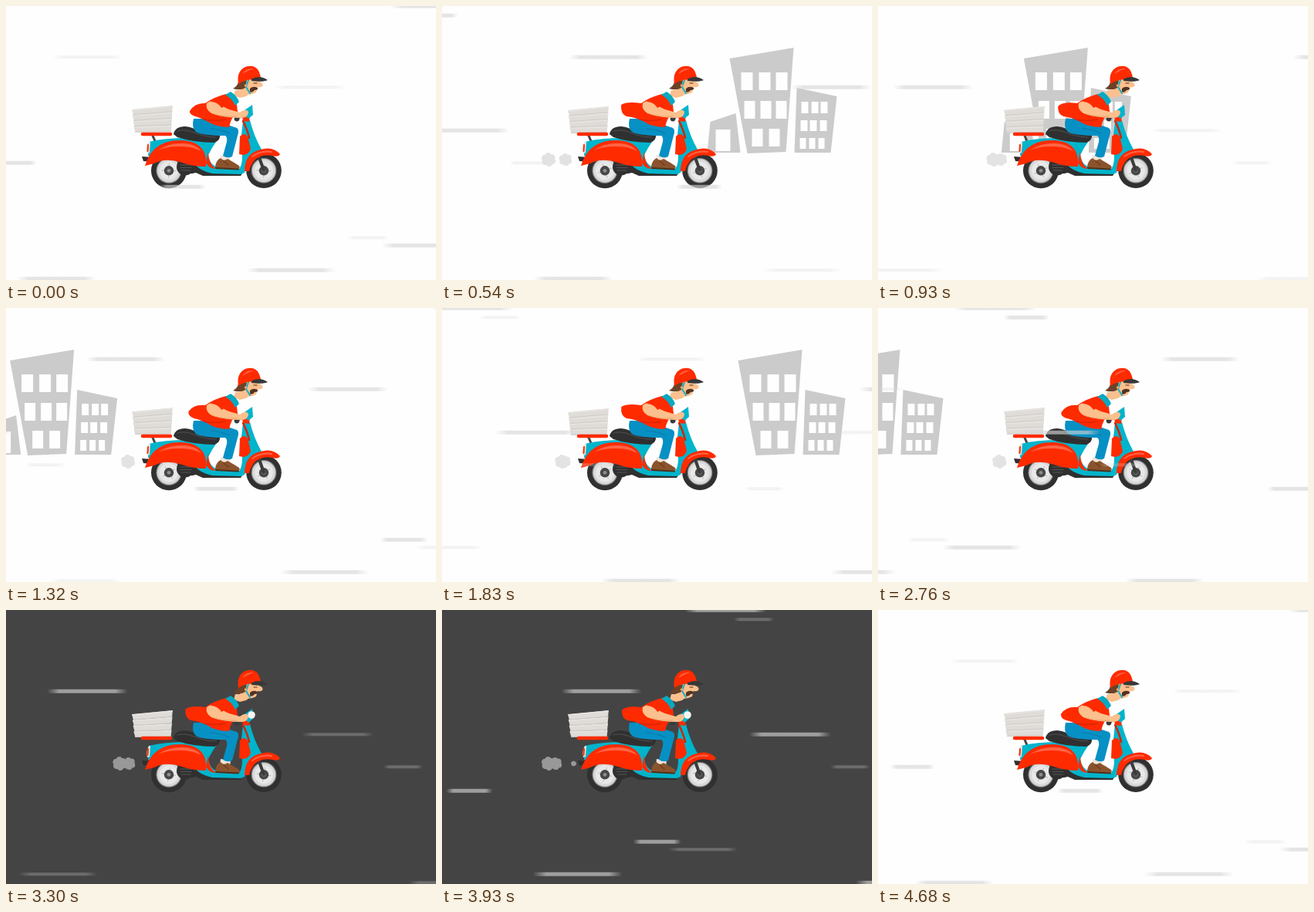
Write an HTML page with a canvas that moves like this. It is 557 px wide and 355 px high and loops after 4710 ms.

```html
<!DOCTYPE html>
<html lang="en">
<head>
<meta charset="utf-8">
<title>Scooter delivery</title>
<style>
html, body { margin: 0; width: 100%; height: 100%; overflow: hidden; background: #fefefe; }
canvas { display: block; }
</style>
</head>
<body>
<canvas id="stage" width="557" height="355"></canvas>
<script>
const ctx = document.getElementById('stage').getContext('2d');
const LOOP = 4710, DUSK = 3000, DAWN = 4480;
const RED = '#ff2b00', CYAN = '#00b4cc', BLACK = '#303030', SKIN = '#fbc08d';
const clamp = v => Math.max(0, Math.min(1, v));
const mix = (a, b, k) => a + (b - a) * clamp(k);

function fill(path, color) {
  ctx.fillStyle = color;
  ctx.fill(new Path2D(path), 'evenodd');
}
function line(path, color, width) {
  ctx.strokeStyle = color;
  ctx.lineWidth = width;
  ctx.lineCap = ctx.lineJoin = 'round';
  ctx.stroke(new Path2D(path));
}
function disc(x, y, r, color) {
  ctx.fillStyle = color;
  ctx.beginPath();
  ctx.arc(x, y, r, 0, Math.PI * 2);
  ctx.fill();
}

// Day and night
const nightAt = t => Math.min(clamp((t - DUSK) / 120), clamp((DAWN - t) / 120));

function drawSky(t) {
  const v = Math.round(mix(254, 68, nightAt(t)));
  ctx.fillStyle = `rgb(${v},${v},${v})`;
  ctx.fillRect(0, 0, 557, 355);
}

// City blocks, relative to the left edge of the tower
const pane = (x, y, w, h) => `M${x} ${y}h${w}v${h}h${-w}z`;
const paneRow = (xs, y, w, h) => xs.map(x => pane(x, y, w, h)).join('');
const TOWER = 'M0 68L83 54L73 189L23 191Z' + paneRow([15, 38, 60], 86, 15, 23) +
  paneRow([19, 40, 60], 123, 14, 23) + paneRow([29, 51], 159, 14, 23);
const BLOCK = 'M87 106L139 117L131 190L84 190Z' + paneRow([93, 106, 118], 124, 9, 15) +
  paneRow([92, 104, 117], 148, 9, 14) + paneRow([91, 103, 115], 171, 8, 14);
const HOUSE = 'M-25 150L8 139L14 190L-29 190Z' + pane(-18, 160, 19, 28);

function drawCity(t) {
  const groups = [[373, 540, TOWER + BLOCK + HOUSE], [384, 1830, TOWER + BLOCK]];
  for (const [x, at, path] of groups) {
    const left = x - (t - at) * 0.471;
    if (left < -145 || left > 600) continue;
    ctx.save();
    ctx.translate(left, 0);
    fill(path, '#cbcbcb');
    ctx.restore();
  }
}

// Speed lines: y, width, delay
const LANES = [
  [0, 106, -240], [12, 60, -183], [66, 103, 0], [105, 104, 259], [161, 106, -165], [203, 58, -70],
  [234, 60, 125], [300, 62, 343], [310, 102, 384], [342, 116, 226], [353, 102, -41]
];
const SINGLE = [0, 12];          // lanes used only by the second kind of wave
const LATE = [300, 310];         // lanes used only by the first kind
const FAINT = [[66, 105, 161, 300], [203, 342], [161, 203, 310, 353], [12, 66, 203, 234]];
const WAVES = [55, 689, 1414, 2058, 2452, 3090, 3811];
const NIGHT_WAVE = 4454;         // cut off when the day returns

function drawStreak(x, y, w, faint) {
  const g = ctx.createLinearGradient(x, 0, x + w, 0);
  const tone = a => `rgba(213,213,213,${a})`;
  const alpha = faint ? 0.27 : 0.62, h = faint ? 4 : 5;
  g.addColorStop(0, tone(0));
  g.addColorStop(0.15, tone(alpha));
  g.addColorStop(0.85, tone(alpha));
  g.addColorStop(1, tone(0));
  ctx.fillStyle = g;
  ctx.beginPath();
  ctx.roundRect(x, y - h / 2 + 0.3, w, h, h / 2);
  ctx.fill();
}
function drawWave(start, kind, t) {
  const unused = kind % 2 ? LATE : SINGLE;
  for (const [y, w, delay] of LANES) {
    if (unused.includes(y)) continue;
    const faint = FAINT[kind % 4].includes(y);
    const width = faint ? w * 0.88 : w;
    const x = (start + delay - t) * 1.111;
    if (x > -width && x < 557) drawStreak(x, y, width, faint);
  }
}
function drawStreaks(t) {
  WAVES.forEach((start, i) => {
    drawWave(start, i, t);
    drawWave(start + LOOP, i, t);
  });
  if (t < DAWN) drawWave(NIGHT_WAVE, 3, t);
}

// Exhaust
const circle = (x, y, r) => `M${x - r} ${y}a${r} ${r} 0 1 0 ${2 * r} 0a${r} ${r} 0 1 0 ${-2 * r} 0z`;
function cloud(x, y, r) {
  let d = circle(x, y, r * 0.6);
  for (let i = 0; i < 6; i++) {
    const a = i * 1.05 + 0.4;
    d += circle(x + Math.cos(a) * r * 0.55, y + Math.sin(a) * r * 0.5, r * 0.45);
  }
  return d;
}
function drawSmoke(t) {
  for (let k = 0; k < 9; k++) {
    const u = (t - 141) / 471 - k;
    if (u < 0 || u > 1.25) continue;
    const r = mix(3, 9.5, u / 0.45);
    const start = mix(172, 158, u / 0.45);
    const spread = (u - 0.55) / 0.3;
    const left = mix(start, 138, spread);
    const right = u < 0.85 ? mix(start, 160, spread) : mix(160, 147, (u - 0.85) / 0.19);
    ctx.fillStyle = `rgba(208,208,208,${0.6 * clamp((1.25 - u) / 0.2)})`;
    ctx.fill(new Path2D(cloud(left, 199, r) + (u > 0.55 ? cloud(right, 199, r * 0.9) : '')));
  }
}

// Scooter
function drawWheel(x, y, r, t) {
  disc(x, y, r, BLACK);
  disc(x, y, r - 6.5, '#8f8f8f');
  disc(x, y, r - 7.8, '#d9d9d9');
  disc(x, y, r - 11, '#e8e8e8');
  ctx.save();
  ctx.translate(x, y);
  ctx.rotate(t * Math.PI * 2 / 157);
  line('M-9 0H9M0 -9V9', '#c3c3c3', 1.2);
  ctx.restore();
  disc(x, y, 6.2, '#474747');
  disc(x, y, 2.4, '#8d8d8d');
}
function drawBoxes(bounce) {
  ctx.save();
  ctx.translate(0, bounce);
  for (let i = 3; i >= 0; i--) {
    const l = 134 + i * 7.4, r = 129 + i * 8.6, x = 163 + i * 0.8, e = 216 - i * 0.5;
    fill(`M${x} ${l}L${e} ${r}L${e - 1} ${r + 8.6}L${x + 2} ${l + 7.6}Z`, '#dfdcd8');
    line(`M${x + 2} ${l + 7}L${e - 1} ${r + 7.8}`, '#cfccc8', 1);
    line(`M${x + 1} ${l + 1}L${e - 1} ${r + 1}`, '#e6e4e1', 1.5);
  }
  ctx.restore();
}
function drawScooter(t) {
  fill('M176 195L190 196L190 202L178 201Z', BLACK);
  line('M190 168L193 175', '#444', 3);
  drawWheel(211, 213.3, 23, t);
  drawWheel(334, 213.3, 22.8, t);
  line('M326 191L334 213', '#3c3c3c', 4);

  fill('M222 203Q240 196 252 205L258 214L306 217L304 220L255 220L246 216Q232 220 222 212Z', BLACK);
  disc(232, 208.5, 11, BLACK);
  line('M226 206H240M226 209.5H240M227 213H239', '#555', 1);

  fill('M185 176Q205 171 236 171L274 173Q267 183 262 193Q264 207 277 210L302 211Q306 206 306 195L305 167L307 148L316 148Q321 168 331 186Q315 195 309 216L304 218L267 217Q250 213 245 205L184 194Z', CYAN);
  fill('M185 176Q181 183 183 191L186 190L187 176Z', '#e9e4df');
  line('M184 180L183.5 188', RED, 2);
  fill('M180 207Q188 179 216 174.500Q246 171 256 188Q260 197 259 208Q242 208 228 203Q206 196 192 204Z', RED);
  fill('M197 187Q210 177 231 178Q246 179 253 188Q240 181 224 182Q208 182 197 187Z', '#ff6547');
  fill('M262 188Q262 205 272 211Q263 211 259 203Z', RED);
  line('M177 166H213', RED, 4.5);
  fill('M217 166Q219 156 232 156Q243 157 250 163Q263 167 277 167Q278 174 270 177Q244 177 222 170Z', BLACK);
  line('M222 162Q232 159 244 164Q258 170 272 170', '#4b4b4b', 1.2);

  fill('M303 169Q308 163 313 169L317 185Q315 192 307 193L302 192Z', RED);
  line('M307 149Q313 161 315 171', '#d32400', 2.5);
  fill('M309 214Q309 193 326 187Q345 180 355 192Q353 196 345 194Q330 191 321 201Q316 208 315 214Z', RED);
  line('M319 195Q330 187 344 189', '#ff6547', 2);
}
function drawHandlebar(night) {
  fill('M305 137Q313 133 316 141L315 150L307 149Z', RED);
  fill('M309 135L319 128L320 141L314 146L311 143Z', CYAN);
  ctx.globalAlpha = night;
  disc(318, 136, 4.8, '#f5f5f3');
  ctx.globalAlpha = 1;
  line('M298 146L308 142', '#444', 2.5);
  disc(299, 146, 3.4, '#3a3a3a');
}

// Rider
function drawRider(flap) {
  fill('M278 193L291 195L290 202L277 202Z', '#f0e4d7');
  fill('M271 208Q272 200 278 197Q282 202 287 198Q296 203 302 207Q304 211 300 211L271 210Z', '#8b532d');
  line('M272 210L301 211.5', '#50301c', 1.8);
  line('M282 201L288 206', '#6a3c20', 1.2);
  fill('M243 146Q240 157 246 163Q254 168 284 168Q287 170 286 176L281 194Q287 198 293 195L301 164Q302 158 296 157L264 146Z', '#0790c4');
  line('M265 159Q280 160 289 165', '#077ba9', 1.2);

  // The shirt tail lifts and sinks in the wind.
  const tail = 235 + 3 * flap, tip = 132 + 4 * flap;
  fill(`M${tail} ${tip}Q${tail + 7} ${124 + flap} 258 126Q269 118 285 114Q294 118 299 128L300 137Q291 145 289 157Q272 157 260 149Q250 144 ${tail + 7} 143Q${tail - 1} 140 ${tail} ${tip}Z`, RED);
  line('M256 147Q270 150 284 147', '#db2400', 1.4);
  fill('M260 126Q266 121 275 123Q280 131 289 134L303 138Q311 132 314 137Q314 144 306 145Q282 145 266 139Q258 134 260 126Z', SKIN);
  line('M270 140Q286 144 299 143', '#eaa873', 1.2);
  fill('M265 124Q272 117 283 117L285 129L279 132Q274 124 265 124Z', RED);

  fill('M297 109L314 109Q316 114 311 117L303 119L295 116Z', SKIN);
  fill('M284 115L291 111Q299 116 302 124L297 129Q292 119 284 115Z', '#08a9c1');
  fill('M306 96L326 95L328 98Q334 100 332 104Q330 106 326 105L324 112Q315 117 308 113L302 107Z', SKIN);
  fill('M301 98L312 96L310 106Q304 110 294 107Q300 104 301 98Z', '#6b4128');
  fill('M316 107Q320 103 326 106Q327 109 322 109Q319 113 316 111Z', '#553322');
  line('M314 96L311 105L316 113', '#15aec5', 2);
  disc(310.5, 103, 1.8, '#e6a570');
  line('M321 100L325 100', '#553322', 1.2);

  fill('M301 101Q298 84 311 78.500Q327 74 330 93L323 96Q311 94 301 101Z', RED);
  fill('M306 88Q311 80 321 81Q312 84 306 88Z', '#ff6547');
  fill('M318 94.500Q329 89 339 96Q333 99 318 97Z', '#383838');
}

function draw(t) {
  const flap = Math.cos(t / LOOP * 22 * Math.PI * 2);
  drawSky(t);
  drawCity(t);
  drawBoxes(0.5 - flap * 0.6);
  drawScooter(t);
  drawHandlebar(nightAt(t));
  drawRider(flap);
  drawSmoke(t);
  drawStreaks(t);
}
function tick(now) {
  draw(now % LOOP);
  requestAnimationFrame(tick);
}
draw(0);
requestAnimationFrame(tick);
</script>
</body>
</html>
```
